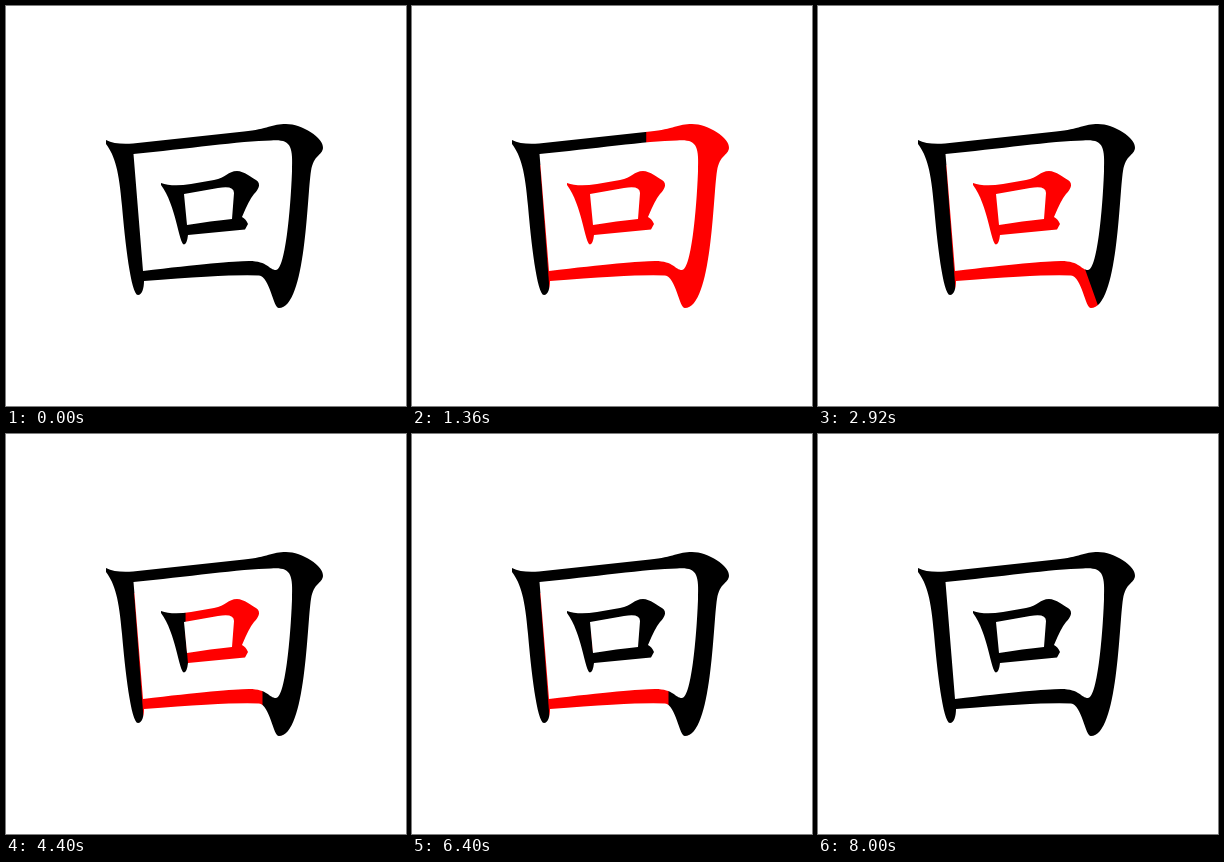
Recreate the animation shown at these times as an HTML page with a canvas. Size 400x400 px, loop 8600 ms.

```html
<!DOCTYPE html>
<html lang="zh">
<head>
<meta charset="utf-8">
<title>回 stroke order</title>
<style>
  html, body { margin: 0; width: 100%; height: 100%; overflow: hidden; background: #fff; }
  canvas { display: block; }
</style>
</head>
<body>
<canvas id="stage" width="400" height="400"></canvas>
<script>
const LOOP = 8600, STEP = 40, FINISHED = 8000;
const ctx = document.getElementById('stage').getContext('2d');

const outerFrame = `
  M100 134 Q110 139 127 137.5 L238 125.5 C262 123 266 118 280 118
  C296 118 318 132 317 142 C316 150 308 148 305 165
  C301 190 300 302 273 302 C267 302 264 271 253 269.5
  Q225 268 138 275 C138 282 136 289 132 289
  C125 289 119 235 116 200 C113 165 109 150 100 138 Z`;
const outerHole = `
  M127.5 148 C180 143 235 135 265 134.5 C285 133 287 140 286 165
  C285 195 280 264 270 264 C263 264 262 255 243 255 Q220 255 137 265 Z`;
const innerFrame = `
  M155 177 Q166 181 185 178 L208 174 C220 172 222 165 231 165
  C238 165 246 172 250 174 C256 178 252 184 248 188
  Q243 194 236 211 Q240 213 242 218 L239 223.5 L182 229
  Q181 238 178 238.5 C173 238 170 199 155 179 Z`;
const innerHole = 'M178 188 L212 182 Q228 179 228 187 L226 213 Q205 215 181 219 Z';
const glyph = new Path2D(outerFrame + outerHole + innerFrame + innerHole);

// A wide brush runs along the route at constant speed and inks the glyph beneath it.
function brush(begin, end, width, route) {
  const line = document.createElementNS('http://www.w3.org/2000/svg', 'path');
  line.setAttribute('d', route);
  return { begin, end, width, path: new Path2D(route), length: line.getTotalLength() };
}

const brushes = [
  brush(0, 800, 34, 'M109 132 L121 291'),
  brush(960, 1480, 56, 'M125 131 H267'),
  brush(1480, 2720, 56, 'M266 131 Q292 131 292 157 V235 Q292 243 278 267'),
  brush(2720, 3160, 58, 'M279 265 L278 267 A14 14 0 0 1 266 274 H256.5'),
  brush(3400, 4160, 28, 'M163 174 L169 241'),
  brush(4360, 5400, 36, 'M176 178 H222 Q240 178 240 196 V213.5'),
  brush(5800, 6400, 34, 'M181 220 H243'),
  brush(6880, 8000, 30, 'M137 265 H257.5')
];

function ink({ begin, end, width, path, length }, t) {
  if (t <= begin) return;
  const progress = Math.min(1, (t - begin) / (end - begin));
  ctx.lineWidth = width;
  ctx.setLineDash([length * progress, 2 * length]);
  ctx.stroke(path);
}

function draw(now) {
  const t = Math.floor((now % LOOP) / STEP) * STEP;
  const complete = t < STEP || t >= FINISHED;
  ctx.globalCompositeOperation = 'source-over';
  ctx.clearRect(0, 0, 400, 400);
  ctx.fillStyle = complete ? '#000' : '#f00';
  ctx.fill(glyph, 'evenodd');
  if (complete) return;
  ctx.globalCompositeOperation = 'source-atop';
  brushes.forEach(b => ink(b, t));
}

const start = performance.now();
function tick() {
  draw(performance.now() - start);
  requestAnimationFrame(tick);
}
tick();
</script>
</body>
</html>
```
